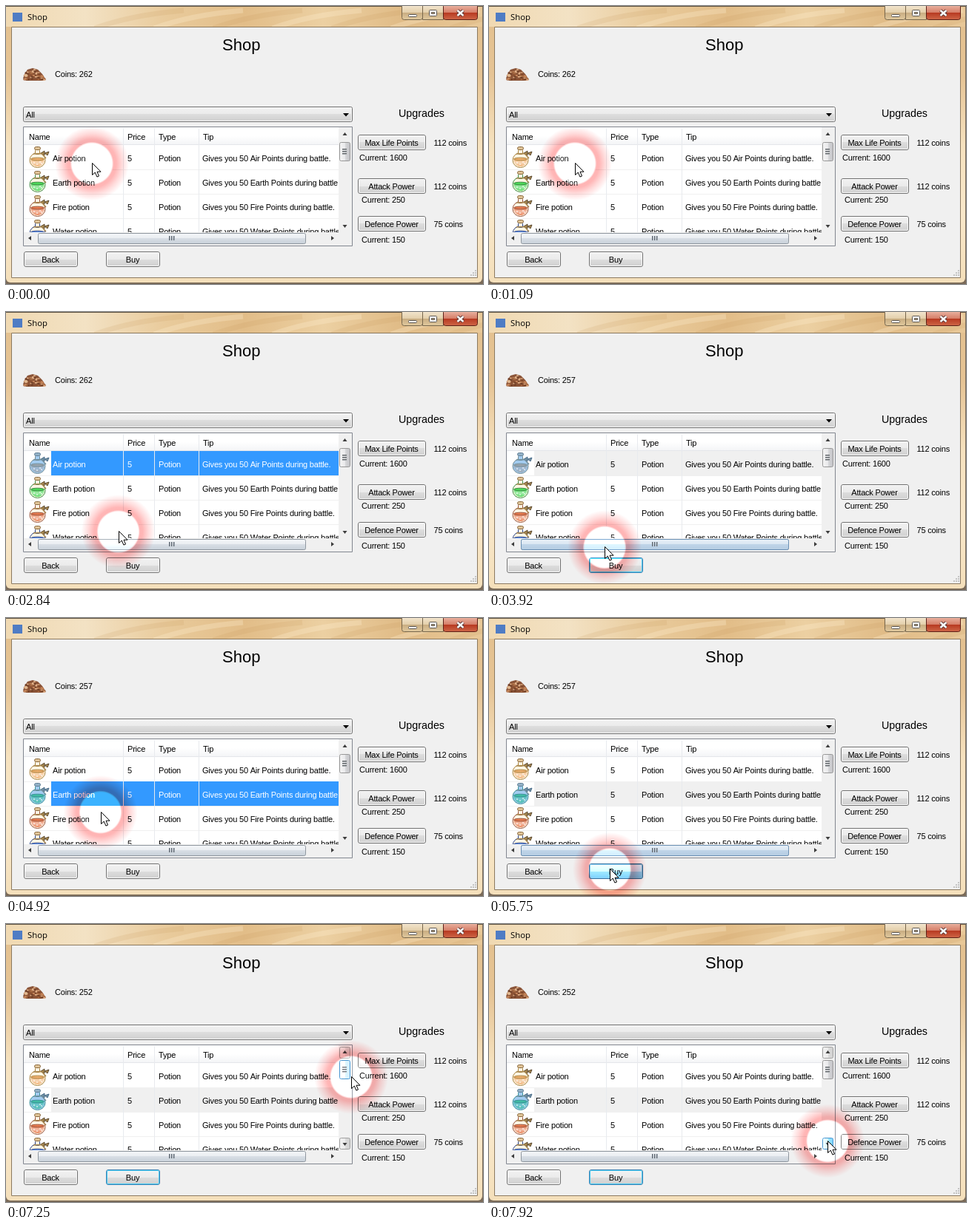
Write an HTML page with a canvas that moves like this. It is 644 px wide and 376 px high and loops after 8000 ms.

```html
<!DOCTYPE html>
<html lang="en">
<head>
<meta charset="utf-8">
<title>Shop</title>
<style>
html, body { margin: 0; width: 100%; height: 100%; overflow: hidden; }
canvas { display: block; width: 644px; height: 376px; }
</style>
</head>
<body>
<canvas id="stage" width="644" height="376"></canvas>
<script>
const ctx = document.getElementById('stage').getContext('2d');
const LOOP = 8000, STEP = 1000 / 12;

// Pointer path: time, x, y
const PATH = [
  [0, 116, 213], [1090, 116, 213], [1250, 110, 219], [1420, 110, 219], [1920, 112, 207],
  [2170, 113, 210], [2840, 152, 298], [3170, 165, 340], [3500, 165, 341], [3920, 156, 318],
  [4400, 113, 231], [4700, 113, 229], [5400, 160, 338], [5590, 163, 340], [5840, 163, 340],
  [6340, 400, 262], [6500, 410, 255], [6720, 480, 222], [7000, 460, 198], [7170, 460, 198],
  [7500, 485, 235], [7920, 457, 294], [8000, 457, 294]
];
// Name, liquid, outline
const POTIONS = [
  ['Air', '#f0b070', '#a8823c'], ['Earth', '#4cd858', '#3c8c44'],
  ['Fire', '#e87c50', '#985038'], ['Water', '#5c8ce0', '#2c4488']
];
const COLUMNS = [158, 200, 260];

function pointerAt(t) {
  const i = Math.max(1, PATH.findIndex(p => p[0] > t));
  const [t0, x0, y0] = PATH[i - 1], [t1, x1, y1] = PATH[i];
  const k = (t - t0) / (t1 - t0);
  return [x0 + (x1 - x0) * k, y0 + (y1 - y0) * k];
}
const between = (t, a, b) => t >= a && t < b;
const fade = (t, a, b) => Math.max(0, Math.min(1, (t - a) / 250, (b - t) / 250));

function rect(x, y, w, h, fill) {
  ctx.fillStyle = fill;
  ctx.fillRect(x, y, w, h);
}
function frame(x, y, w, h, stroke, radius = 0, fill) {
  ctx.beginPath();
  ctx.roundRect(x + .5, y + .5, w - 1, h - 1, radius);
  if (fill) { ctx.fillStyle = fill; ctx.fill(); }
  ctx.lineWidth = 1;
  ctx.strokeStyle = stroke;
  ctx.stroke();
}
function shape(points, fill, stroke) {
  ctx.beginPath();
  points.forEach(([x, y]) => ctx.lineTo(x, y));
  ctx.closePath();
  ctx.fillStyle = fill;
  ctx.fill();
  if (stroke) { ctx.lineWidth = 1; ctx.strokeStyle = stroke; ctx.stroke(); }
}
function oval(x, y, rx, ry, fill, stroke) {
  ctx.beginPath();
  ctx.ellipse(x, y, rx, ry, 0, 0, 7);
  ctx.fillStyle = fill;
  ctx.fill();
  if (stroke) { ctx.lineWidth = 1; ctx.strokeStyle = stroke; ctx.stroke(); }
}
function gradient(x0, y0, x1, y1, ...stops) {
  const g = ctx.createLinearGradient(x0, y0, x1, y1);
  stops.forEach((c, i) => g.addColorStop(i / (stops.length - 1), c));
  return g;
}
// Two-part glossy fill with a hard break in the middle
function gloss(x0, y0, x1, y1, [a, b, c, d]) {
  const g = ctx.createLinearGradient(x0, y0, x1, y1);
  [[0, a], [.5, b], [.5, c], [1, d]].forEach(s => g.addColorStop(...s));
  return g;
}
function text(s, x, y, { size = 11, color = '#000', align = 'left', face = '"Liberation Sans", Arial, sans-serif' } = {}) {
  ctx.font = `${size}px ${face}`;
  ctx.letterSpacing = size === 11 ? '-0.2px' : '0px';
  ctx.textAlign = align;
  ctx.fillStyle = color;
  ctx.fillText(s, x, y);
}

const GREY = ['#f2f2f2', '#ebebeb', '#dddddd', '#cfcfcf'];
const BLUE = ['#d8f0fc', '#b8e0f6', '#8ccaec', '#68b3db'];
const THUMB = ['#f5f7f9', '#e9edf1', '#d8dee5', '#c7d0d9'];
const HOT_THUMB = ['#eaf1f8', '#d9e6f2', '#bfd4e8', '#b4cce2'];

function button(label, x, y, w, state = 'normal') {
  const pressed = state === 'pressed', focus = state === 'focus';
  frame(x, y, w, 21, pressed ? '#2c628b' : focus ? '#3c7fb1' : '#707070', 2.5,
    gloss(0, y, 0, y + 21, pressed ? BLUE : GREY));
  frame(x + 1, y + 1, w - 2, 19, pressed ? '#7ab4d4' : focus ? '#48cdf4' : '#fafafa', 1.5);
  text(label, x + w / 2 - .5, y + 15, { align: 'center' });
}

function drawWindow() {
  rect(0, 0, 644, 376, '#7a6a58');
  ctx.beginPath();
  ctx.roundRect(0, -6, 643, 380, 6);
  ctx.fillStyle = gradient(0, 0, 0, 376, '#e3c08e', '#e6c495', '#f6e2bf', '#f9e8ca', '#f4dfba');
  ctx.fill();
  rect(0, 1, 643, 27, gradient(0, 0, 643, 0, '#f0d9b2', '#f3e2c4', '#e9cb9c', '#e2bd88', '#ecd0a2', '#e0bb86', '#e8c898'));
  // Blurred wood grain behind the glass
  ctx.save();
  ctx.beginPath();
  ctx.rect(0, 1, 643, 27);
  ctx.clip();
  for (let i = 0; i < 7; i++) {
    ctx.beginPath();
    ctx.moveTo(120 + i * 80, 30);
    ctx.quadraticCurveTo(170 + i * 80, 12, 240 + i * 80, 6);
    ctx.lineWidth = 7;
    ctx.strokeStyle = i % 2 ? 'rgba(255,240,210,.28)' : 'rgba(190,140,80,.14)';
    ctx.stroke();
  }
  ctx.restore();
  rect(0, 0, 644, 1, '#5d5140');
  frame(7, 28, 630, 340, '#8c7a60', 0, '#f0f0f0');

  rect(9, 9, 13, 12, '#4f7cc4');
  text('Shop', 29, 19, { size: 11.3, face: '"Open Sans", "Noto Sans", sans-serif' });

  const tan = gloss(0, 0, 0, 19, ['#f2e4cc', '#e2cda8', '#c9ad82', '#e2cba0']);
  frame(534, -3, 29, 22, '#76664c', 3, tan);
  frame(562, -3, 29, 22, '#76664c', 0, tan);
  frame(590, -3, 47, 22, '#5c2018', 3, gloss(0, 0, 0, 19, ['#e8ae9c', '#d47a64', '#b83a22', '#d0694a']));
  frame(543, 11, 12, 4, '#5a5550', 1, '#fff');
  frame(571, 5, 11, 9, '#5a5550', 1, '#fff');
  frame(574, 8, 5, 3, '#5a5550', 0, '#c8b18a');
  for (const [color, width] of [['#5c3a38', 4.4], ['#fff', 2.4]]) {
    ctx.beginPath();
    ctx.moveTo(609.5, 6); ctx.lineTo(617.5, 13);
    ctx.moveTo(617.5, 6); ctx.lineTo(609.5, 13);
    ctx.lineWidth = width;
    ctx.strokeStyle = color;
    ctx.stroke();
  }
  for (let i = 0; i < 3; i++)
    for (let j = 0; j <= i; j++) rect(633 - j * 3, 357 + i * 3, 2, 2, '#c4c4c4');
}

function drawCoins() {
  let seed = 7;
  const random = () => (seed = seed * 16807 % 2147483647) / 2147483647;
  const colors = ['#8c5030', '#c8885c', '#6c3c24', '#e0b088', '#a86c44'];
  shape([[23, 98], [25, 92], [29, 86], [36, 84], [43, 86], [49, 92], [54, 100], [48, 101], [27, 101]], '#8a5438');
  for (let i = 0; i < 75; i++) {
    const x = 25 + random() * 27;
    const top = 85 + Math.abs(x - 36) ** 1.5 * .2;
    oval(x, top + random() * (100 - top), 1.7, 1, colors[i % 5]);
  }
  oval(27, 94, 2.5, 2, '#e0b890');
}

function mix(a, b, k) {
  const part = (c, i) => parseInt(c.slice(i, i + 2), 16);
  return `rgb(${[1, 3, 5].map(i => Math.round(part(a, i) * (1 - k) + part(b, i) * k))})`;
}

function potion(y, liquid, edge, tinted) {
  const tone = c => mix(c, '#3399ff', tinted ? .45 : 0);
  const glass = tone('#fff6e4'), line = tone(edge), fill = tone(liquid);
  const bow = tone('#a88850'), dark = tone('#5c4a30');
  oval(42.5, y + 20.5, 10.5, 10, glass, line);
  ctx.beginPath();
  ctx.ellipse(42.5, y + 20.5, 9, 8.5, 0, -.15, Math.PI + .15);
  ctx.fillStyle = gradient(0, y + 18, 0, y + 30, fill, tone(mixHex(liquid)), fill);
  ctx.fill();
  oval(42.5, y + 19, 9, 1.8, fill, line);
  [[38, 24], [42, 26], [46, 23], [48, 25]].forEach(([x, dy]) => oval(x, y + dy, 1.1, 1, 'rgba(255,255,255,.65)'));
  frame(39, y + 6, 7, 7, line, 1, glass);
  frame(38, y + 2, 9, 5, tone('#8a6a40'), 2, tone('#e0c498'));
  shape([[47, y + 11], [52, y + 8], [52, y + 14]], bow, dark);
  shape([[52, y + 11], [58, y + 9], [56, y + 14]], bow, dark);
  ctx.beginPath();
  ctx.moveTo(37, y + 12); ctx.lineTo(48, y + 11.5); ctx.lineTo(54, y + 18);
  ctx.strokeStyle = bow;
  ctx.lineWidth = 1.5;
  ctx.stroke();
}
// Pale variant of a hex colour, again as hex
function mixHex(c) {
  return '#' + [1, 3, 5].map(i => (parseInt(c.slice(i, i + 2), 16) + 255 >> 1).toString(16)).join('');
}

function arrow(x, y, dx, dy, size = 3) {
  shape([[x + dx * size, y + dy * size], [x - dx - dy * size, y - dy - dx * size],
    [x - dx + dy * size, y - dy + dx * size]], '#3c3c3c');
}

function drawList(t, x, y) {
  frame(23, 163, 445, 162, '#828790', 0, '#fff');
  const selected = t < 2090 ? -1 : t < 4500 ? 0 : 1;
  const active = between(t, 2090, 3250) || between(t, 4500, 5660);

  rect(24, 164, 425, 23, gradient(0, 164, 0, 187, '#fff', '#fff', '#f4f5f7'));
  ['Name', 'Price', 'Type', 'Tip'].forEach((s, i) => text(s, [31, 164, 206, 266][i], 181));
  rect(24, 187, 425, 1, '#e4e6ea');

  ctx.save();
  ctx.beginPath();
  ctx.rect(24, 164, 425, 142);
  ctx.clip();
  POTIONS.forEach(([name, liquid, edge], i) => {
    const top = 188 + i * 33, chosen = i === selected;
    if (chosen) rect(61, top, 388, 33, active ? '#3399ff' : '#f0f0f0');
    rect(24, top + 33, 425, 1, '#f0f0f0');
    potion(top, liquid, edge, chosen);
    const color = chosen && active ? '#fff' : '#000';
    [name + ' potion', '5', 'Potion', `Gives you 50 ${name} Points during battle.`]
      .forEach((s, c) => text(s, [63, 164, 206, 265][c], top + 22, { color }));
  });
  COLUMNS.forEach(c => rect(c, 165, 1, 141, '#e8eaee'));
  ctx.restore();

  // Scroll bars
  const hot = Math.max(fade(t, 2950, 4500), fade(t, 5250, 6800));
  const overVertical = t > 6700 && between(x, 448, 468);
  rect(24, 306, 425, 18, '#f0f0f0');
  rect(449, 164, 18, 160, '#f0f0f0');
  frame(43, 307, 362, 15, '#8f979f', 2, gloss(0, 307, 0, 322, THUMB));
  ctx.globalAlpha = hot;
  frame(43, 307, 362, 15, '#6a90b4', 2, gloss(0, 307, 0, 322, HOT_THUMB));
  ctx.globalAlpha = 1;
  const thumbHot = overVertical && y < 212;
  frame(450, 184, 15, 26, thumbHot ? '#3c7fb1' : '#979797', 2,
    gloss(450, 0, 465, 0, thumbHot ? HOT_THUMB : ['#f5f5f5', '#e9e9eb', '#d9dadc', '#c0c0c4']));
  for (let i = 0; i < 3; i++) {
    rect(220 + i * 3, 311, 1, 6, '#5c6670');
    rect(221 + i * 3, 311, 1, 6, '#a8b0b8');
    rect(454, 193 + i * 3, 6, 1, '#606468');
    rect(454, 194 + i * 3, 6, 1, '#a8acb0');
  }
  if (overVertical) {
    const overDown = y > 280;
    frame(450, 166, 15, 16, '#a0a0a0', 2, gloss(450, 0, 465, 0, GREY));
    frame(450, 289, 15, 16, overDown ? '#3c7fb1' : '#a0a0a0', 2, gloss(450, 0, 465, 0, overDown ? BLUE : GREY));
  }
  arrow(457.5, 174, 0, -1);
  arrow(457.5, 297, 0, 1);
  arrow(33, 314, -1, 0);
  arrow(440, 314, 1, 0);
}

function drawPointer(x, y) {
  ctx.globalCompositeOperation = 'color-dodge';
  oval(x, y, 29, 29, '#242424');
  ctx.globalCompositeOperation = 'multiply';
  const glow = ctx.createRadialGradient(x, y, 27, x, y, 50);
  [[0, '#fff'], [.1, '#ffb4b4'], [.25, '#ffb6b6'], [.6, '#ffdcdc'], [1, '#fff']].forEach(s => glow.addColorStop(...s));
  oval(x, y, 50, 50, glow);
  ctx.globalCompositeOperation = 'source-over';
  const px = Math.round(x) + .5, py = Math.round(y) - .5;
  shape([[0, 0], [0, 16], [3.8, 12.6], [6.4, 18.6], [9, 17.5], [6.5, 11.7], [11.5, 11.7]]
    .map(([a, b]) => [px + a, py + b]), '#fff', '#000');
}

function draw(t) {
  const [x, y] = pointerAt(t);
  drawWindow();
  text('Shop', 292, 60, { size: 22 });
  drawCoins();
  text('Coins: ' + (t < 3410 ? 262 : t < 5830 ? 257 : 252), 66, 96);

  frame(23, 136, 445, 21, '#707070', 2, gloss(0, 136, 0, 157, GREY));
  frame(24, 137, 443, 19, '#f8f8f8', 1);
  text('All', 27, 151);
  shape([[455, 145], [463, 145], [459, 149.5]], '#000');

  drawList(t, x, y);
  const pressed = between(t, 3250, 3410) || between(t, 5660, 5830);
  const focused = between(t, 3410, 4500) || t >= 5830;
  button('Back', 24, 332, 73);
  button('Buy', 135, 332, 73, pressed ? 'pressed' : focused ? 'focus' : 'normal');

  text('Upgrades', 530, 150, { size: 14.3 });
  [['Max Life Points', 174, 112, 1600, 477, 209], ['Attack Power', 233, 112, 250, 480, 266],
    ['Defence Power', 284, 75, 150, 480, 320]].forEach(([label, top, cost, value, vx, vy]) => {
    button(label, 475, top, 92);
    text(cost + ' coins', 577.5, top + 15);
    text('Current: ' + value, vx, vy);
  });
  drawPointer(x, y);
}

function tick() {
  const t = performance.now() % LOOP;
  draw(Math.floor(t / STEP) * STEP);
  requestAnimationFrame(tick);
}
tick();
</script>
</body>
</html>
```
